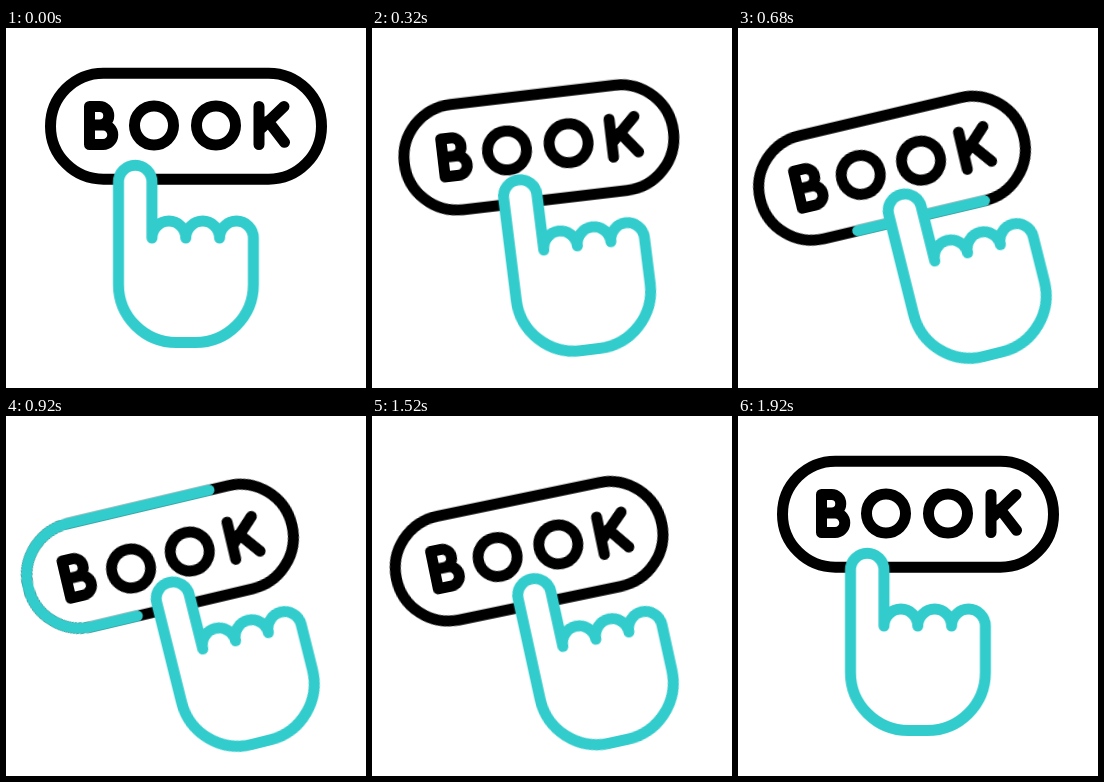
These frames come from a looping animation (360 px wide and 360 px high, 2000 ms). An HTML page:

```html
<!DOCTYPE html>
<html lang="en">
<head>
<meta charset="utf-8">
<title>Book button</title>
<style>
  html, body { margin: 0; width: 100%; height: 100%; overflow: hidden; background: #fff; }
  svg { display: block; width: 100%; height: 100%; }
  svg * { animation: 2s infinite; }
  g, path, circle { fill: none; stroke-width: 11; stroke-linejoin: round; }
  .ink { stroke: #000; }
  .accent { stroke: #33cccc; }
  .letters, #trace { stroke-linecap: round; }

  #button { animation-name: tilt-button; }
  #hand { animation-name: press; }
  #hand path { fill: #fff; }
  #button, #hand { animation-timing-function: cubic-bezier(.37, 0, .63, 1); }

  @keyframes tilt-button {
    0%, 8%, 90%, 100% { transform: translate(180px, 98px) rotate(0deg); }
    24%, 72% { transform: translate(154px, 140px) rotate(-13.3deg); }
  }
  @keyframes press {
    0%, 8%, 90%, 100% { transform: translate(129.25px, 154px) rotate(0deg); }
    24%, 72% { transform: translate(167px, 182.7px) rotate(-14deg); }
  }

  /* An accent dash grows round the outline, then its tail catches up. */
  #trace { animation-name: trace; animation-timing-function: linear; }
  @keyframes trace {
    0%, 28% { stroke-dasharray: 0 200; stroke-dashoffset: 0; visibility: hidden; }
    28.1% { visibility: visible; }
    40% { stroke-dasharray: 39 200; stroke-dashoffset: 0; }
    46% { stroke-dasharray: 54.2 200; stroke-dashoffset: -17.6; }
    56% { stroke-dasharray: 30 200; stroke-dashoffset: -70; }
    61.4% { visibility: visible; }
    61.5%, 100% { stroke-dasharray: 0 200; stroke-dashoffset: -100; visibility: hidden; }
  }

  .letters, .letters * { animation-timing-function: ease-in-out; }
  .letters { animation-name: dip; }
  #first-o { animation-name: bounce-first; }
  #second-o { animation-name: bounce-second; }
  @keyframes dip {
    0%, 38%, 54%, 100% { transform: translateY(0); }
    46% { transform: translateY(2px); }
  }
  @keyframes bounce-first {
    0%, 38%, 72%, 100% { transform: translate(0, 0); }
    46% { transform: translate(1px, 4px); }
    62% { transform: translate(-1.5px, -5.3px); }
  }
  @keyframes bounce-second {
    0%, 38%, 72%, 100% { transform: translate(0, 0); }
    46% { transform: translate(0, 1px); }
    62% { transform: translate(-1.5px, -5.5px); }
  }
</style>
</head>
<body>
<svg viewBox="0 0 360 360" role="img" aria-label="BOOK">
  <defs>
    <path id="pill" pathLength="100" d="M82.5 53.2H-82.5a53 53 0 0 1 0-106H82.5a53 53 0 0 1 0 106Z"/>
  </defs>
  <g id="button">
    <use href="#pill" class="ink"/>
    <use href="#pill" id="trace" class="accent"/>
    <g class="ink letters">
      <path d="M-96.5-19.5V18.5H-83a9.75 9.75 0 0 0 0-19.5H-96.5M-96.5-19.5H-86.5a9.25 9.25 0 0 1 0 18.5"/>
      <circle id="first-o" cx="-32" cy="-.5" r="19.5"/>
      <circle id="second-o" cx="30" cy="-.5" r="19.5"/>
      <path d="M73-19.5V18.5M98-19.5L74 3.5M82-5L98.5 16.3"/>
    </g>
  </g>
  <g id="hand" class="accent">
    <path d="M-16.75 0a16.75 16.75 0 0 1 33.5 0V56a16.9 16.9 0 0 1 33.8 0a16.9 16.9 0 0 1 33.8 0a16.9 16.9 0 0 1 33.8 0V102.5a58 58 0 0 1-58 58H41.25a58 58 0 0 1-58-58Z"/>
  </g>
</svg>
</body>
</html>
```
